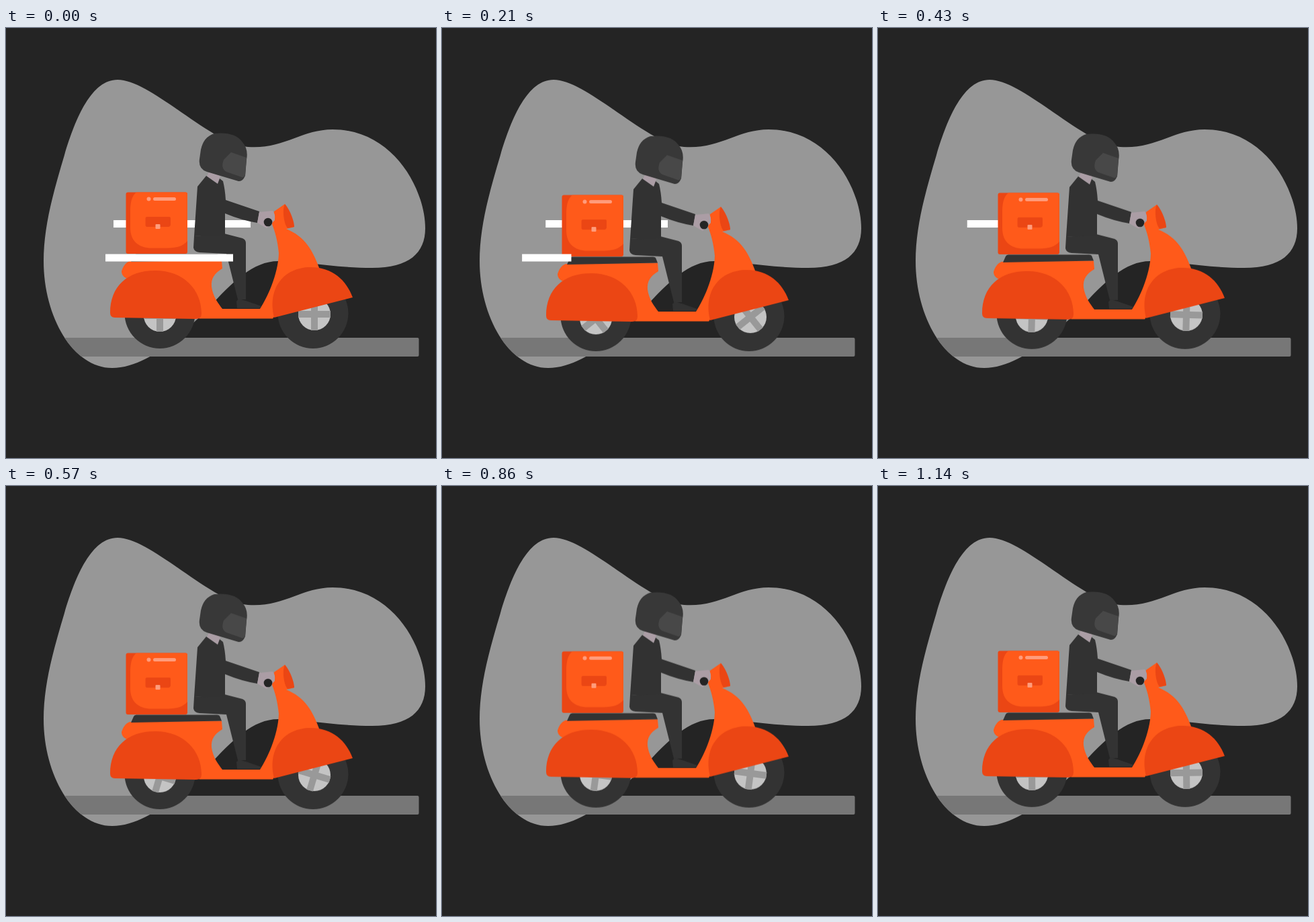
An HTML page that plays this animation: 640 by 640 pixels, repeating every 1210 ms.

```html
<!DOCTYPE html>
<html lang="en">
<head>
<meta charset="utf-8">
<title>Scooter courier</title>
<style>
  html, body { margin: 0; width: 100%; height: 100%; overflow: hidden; background: #242424; }
  svg { display: block; width: 100%; height: 100%; }

  .bob, .spin, .line { animation: 1210ms linear infinite; transform-origin: 0 0; }
  .bob { animation-name: bob; }
  .spin { animation-name: spin; animation-timing-function: cubic-bezier(.6, 0, .2, 1); }
  .low { animation-name: low; animation-timing-function: cubic-bezier(.333, .15, .667, .55); }
  .high { animation-name: high; animation-timing-function: cubic-bezier(.333, 0, .667, .21); }

  @keyframes bob {
    0%, 32.35%, 64.7%, 97.05%, 100% { transform: translateY(0); }
    16.18%, 48.53%, 80.88% { transform: translateY(4.5px); }
  }
  @keyframes spin {
    0% { transform: rotate(0deg); }
    32.35% { transform: rotate(180deg); }
    64.7% { transform: rotate(360deg); }
    97.05%, 100% { transform: rotate(540deg); }
  }
  /* Each streak is a 1px wide bar, placed and stretched. */
  @keyframes low {
    0% { transform: translateX(148px) scaleX(190); }
    25.2%, 100% { transform: translateX(101px) scaleX(0); }
  }
  @keyframes high {
    0% { transform: translateX(160px) scaleX(204); }
    46.9%, 100% { transform: translateX(107px) scaleX(0); }
  }

  .orange { fill: #ff5a1a; }
  .rust { fill: #eb4614; }
  .peach { fill: #ff9c7c; }
  .dark { fill: #333; }
  .suit { fill: #323232; }
  .skin { fill: #ab9da5; }
  .rim { fill: #c4c4c4; }
  .spin { fill: #999; }
</style>
</head>
<body>
<svg viewBox="0 0 640 640">
  <path fill="#979797" d="M166 77C128 77 104 132 87 189C70 246 56 296 56 347C56 430 100 506 158 506
    C210 506 265 454 302 416C337 378 368 347 405 347C440 347 490 357 545 357C600 357 624 335 624 298
    C624 241 577 151 486 151C440 151 412 181 360 177C305 173 216 77 166 77Z"/>
  <path fill="#777" d="M87 461H612.500Q614.500 461 614.500 463V487Q614.500 489 612.500 489H112Q98 478 87 461Z"/>

  <rect class="line high" y="286" width="1" height="11" fill="#fff"/>

  <g class="bob">
    <!-- wheels -->
    <circle class="dark" cx="229" cy="424.500" r="52.500"/>
    <circle class="dark" cx="457" cy="424.500" r="52.500"/>
    <g transform="translate(229 428)">
      <circle class="rim" r="24"/>
      <path class="spin" d="M-24 -5H24V5H-24ZM-5 -24H5V24H-5Z"/>
    </g>
    <g transform="translate(459 426)">
      <circle class="rim" r="24"/>
      <path class="spin" d="M-24 -5H24V5H-24ZM-5 -24H5V24H-5Z"/>
    </g>

    <!-- scooter -->
    <path class="orange" d="M184 347L321 345.500L322 358C310 365 305 373 306 385C308 400 316 410 322 418H378
      C388 403 405 368 406 335C404 315 400 302 396 292L399 273L415 262L429 296L417 299
      C445 310 457 332 466 357L440 372L397 432.500H288L200 400L187 375C176 373 172 368 172 362C174 355 178 349 184 347Z"/>
    <path class="dark" d="M186 348L190 339Q191 336.500 194 336.500H314Q317 336.500 318 338L321 345.500Z"/>
    <path class="rust" d="M155 424C155 385 180 361 222 361C265 361 291 390 291 425Q291 433 283 433L162 431Q155 431 155 424Z"/>
    <path class="rust" d="M399 431C388 386 415 356 453 356C486 356 506 375 516 401Z"/>
    <path class="rust" d="M415 262C421 268 429 286 429 296L419 298C413 290 411 270 415 262Z"/>

    <!-- delivery box -->
    <rect class="rust" x="178.500" y="244.500" width="91.500" height="91.500" rx="3"/>
    <path class="orange" d="M194 244.500C187 250 185 260 185 272V297C185 317 197 327.500 217 327.500H240
      C255 327.500 264 324 270 317V247Q270 244.500 267.500 244.500Z"/>
    <circle class="peach" cx="212.500" cy="254.500" r="3"/>
    <rect class="peach" x="219" y="252" width="34" height="5" rx="2.500"/>
    <path class="rust" d="M210 281H243Q245 281 245 283V292Q245 296 241 296H210Q207.500 296 207.500 293V283.500Q207.500 281 210 281Z"/>
    <rect class="peach" x="222.500" y="292" width="7" height="7" rx="1"/>

    <!-- rider -->
    <path class="skin" d="M302 214L319 220L316 232L299 221Z"/>
    <path class="dark" d="M280 310L279 327Q280 333 288 334L328 336L345 404H357V320Q357 315 352 313L325 306Z"/>
    <path class="suit" d="M346 403L357 406L380 414L378 417H344L343 407Z"/>
    <path class="suit" d="M298 220L315 232L318 224L323 228Q326 240 327 256L377 273L374 290Q350 286 326 276V308L280 310L285 236Z"/>
    <path class="skin" d="M377 274L397 272Q401 276 400 286L388 298L374 290Z"/>
    <circle cx="390" cy="289" r="6.300" fill="#242424"/>
    <path fill="#383838" d="M310 157Q341 154 352 170Q361 180 358 196L356 220Q352 229 346 228L299 214Q286 210 288 195L290 181Q294 162 310 157Z"/>
    <path fill="#484848" d="M335 185L358 193L356 219Q354 224 348 221L328 214Q319 209 324 196Z"/>
  </g>

  <rect class="line low" y="336.500" width="1" height="11" fill="#fff"/>
</svg>
<script>
  // Hold every pose for one seventeenth of the loop.
  const LOOP = 1210, POSES = 17, LEAD = 4;
  const moves = document.getAnimations();
  moves.forEach(move => move.pause());
  const start = performance.now();

  function draw() {
    const time = (performance.now() - start) % LOOP;
    const pose = Math.min(POSES - 1, Math.floor((time + LEAD) * POSES / LOOP));
    moves.forEach(move => { move.currentTime = pose * LOOP / POSES; });
    requestAnimationFrame(draw);
  }
  draw();
</script>
</body>
</html>
```
